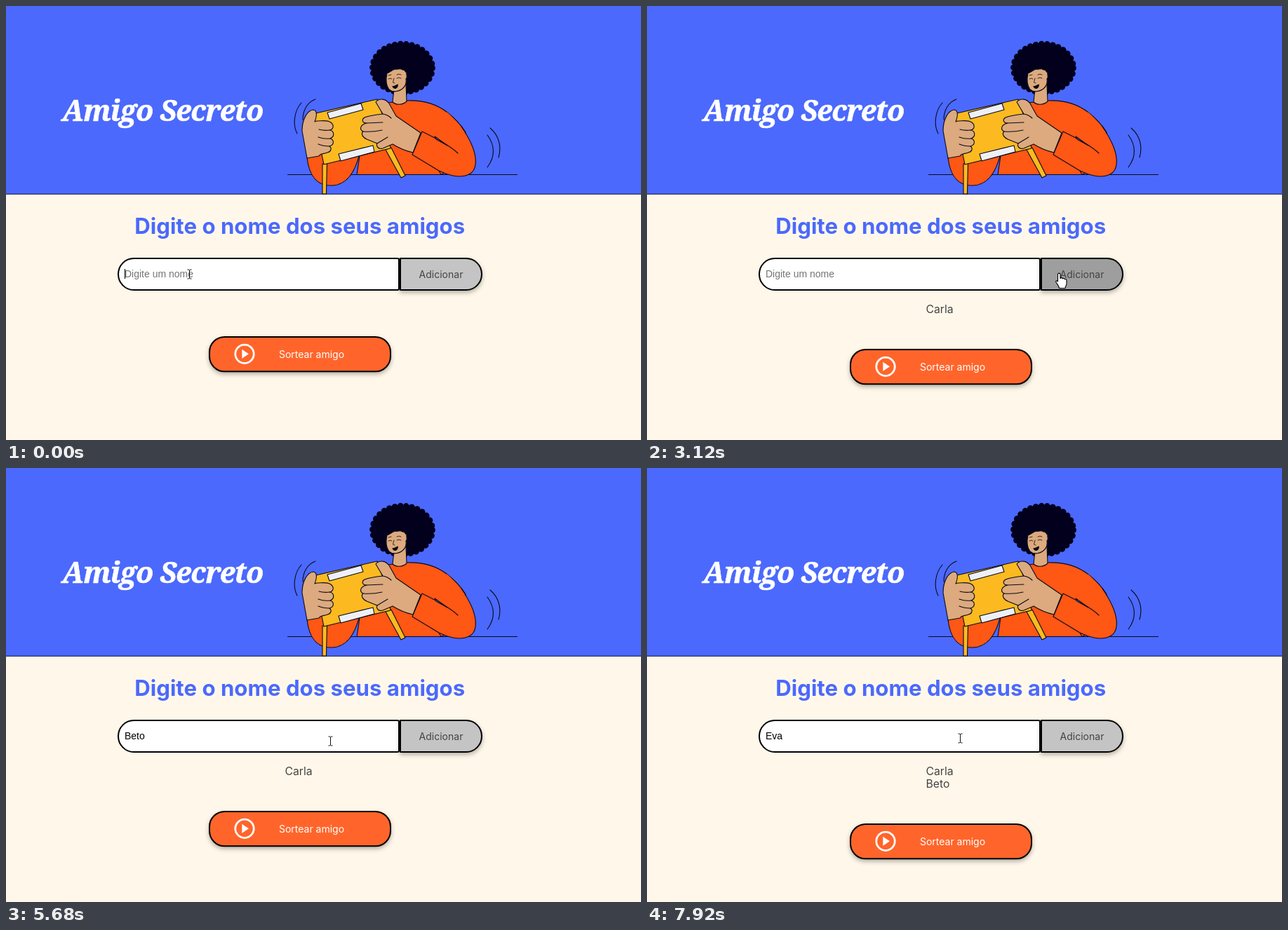
An HTML page that plays this animation: 905 by 619 pixels, repeating every 8000 ms.

```html
<!DOCTYPE html>
<html lang="pt-BR">
<head>
<meta charset="utf-8">
<title>Amigo Secreto</title>
<style>
  html, body { margin: 0; width: 100%; height: 100%; overflow: hidden; background: #fff8ea; }
  svg { display: block; width: 905px; height: 619px; }
  text { font-family: Inter, sans-serif; font-size: 14px; }
  .title { font: italic 900 41px "Noto Serif", serif; letter-spacing: -.95px; fill: #fff; stroke: #fff; stroke-width: .7; }
  .heading { font-size: 31.2px; font-weight: 700; fill: #4b69fd; }
  .field { font-family: "Liberation Sans", Arial, sans-serif; }
  .names text { font-size: 15.75px; fill: #444; }
  .art { stroke: #0a0a18; stroke-width: 1.1; stroke-linejoin: round; stroke-linecap: round; fill: none; }
  .skin { fill: #dcaa7e; }
  .shirt { fill: #ff5714; }
  .box { fill: #fcba20; }
  .label { fill: #eef0f8; }
  .hair { fill: #03001e; stroke: none; }
  .tuft { stroke: #03001e; stroke-width: 9; stroke-dasharray: 0 8.1; }
  .raised { filter: drop-shadow(0 3px 3px rgba(0, 0, 0, .3)); }
  .edge { stroke: #000; stroke-width: 2; }
</style>
</head>
<body>
<svg viewBox="0 0 905 619">
  <rect width="905" height="619" fill="#fff8ea"/>
  <rect width="905" height="268" fill="#4b69fd"/>
  <rect y="267.800" width="905" height="1" fill="#10102a"/>
  <text class="title" x="80" y="163.500">Amigo Secreto</text>

  <g class="art">
    <path d="M401.500 240.500H728.500"/>
    <path d="M415 182C408 169 411 149 421 138M423 162C423 148 430 137 441 133M686 184C697 199 697 215 686 230M690 174C704 186 706 202 702 216"/>

    <!-- torso and far sleeve -->
    <path class="shirt" d="M429 216C432 244 445 257 465 256C486 255 498 236 504 210L455 200Z"/>
    <path class="shirt" d="M500 240.500L506 200L528 140L552 137C558 141 566 140 571 135C591 134 612 139 628 151C641 161 650 172 655 180L648 226L620 240.500Z"/>

    <!-- head -->
    <ellipse class="hair" cx="565" cy="89" rx="44" ry="36"/>
    <ellipse class="tuft" cx="565" cy="88.500" rx="42.500" ry="34.200"/>
    <path class="skin" d="M553 118L551 137C556 142 566 141 571 136L570 112Z"/>
    <path class="skin" d="M543 96C541 105 542 114 546 119C551 124 561 122 566 117C570 113 571 109 570 104C573 101 570 98 571 95C568 94 569 90 565 91C562 88 558 91 555 90C550 91 547 95 543 96Z"/>
    <path stroke-width=".8" d="M545 104Q548 102 550 104M557 103Q560 101 563 103M545 99L549 98M557 98Q560 96 563 98M553 103L551.500 109L554 110"/>
    <path fill="#0a0a18" stroke="none" d="M550 114C554 115 556 111.500 559 111.500C559 116 556.500 118.500 554 118Q551 117 550 114Z"/>

    <!-- chair seat and legs -->
    <path class="box" d="M451 225L457.500 224L456.500 268H451ZM541 205L549 202L569 242L563 245Z"/>
    <path class="box" d="M437 154L529 133L541 168L548 203L453 226L444 182Z"/>
    <path class="label" d="M458 152L506 139L509 148L461 161ZM474 211L523 199L525 208L477 221Z"/>

    <!-- left hand -->
    <path class="skin" d="M429 217L422 178C422 162 429 149 438 148C444 149 443 157 440 165L443 164C450 164 457 162 463 166C468 170 467 176 461 177C468 178 469 186 462 189C468 191 468 198 461 200C465 203 463 208 458 209C453 211 448 210 446 214Z"/>
    <path d="M461 177Q453 178 446 176M462 189Q453 190 445 187M461 200Q452 200 445 197"/>

    <!-- near arm and right hand -->
    <path class="shirt" d="M593 179L644 210L628 151C643 163 658 185 665 201C671 217 672 234 660 240C646 247 627 241 617 235L579 212Z" stroke="none"/>
    <path d="M644 210Q632 198 593 179L579 212L617 235C627 240 646 247 660 240C672 234 671 217 665 201C661 191 656 182 649 172M617 235L620 240.500"/>
    <path fill="#4b69fd" d="M611 186L629 199L613 190Z"/>
    <path class="skin" d="M591 181L556 157L546 139C541 132 532 131 527 137L537 154C528 155 519 156 511 159C506 162 508 167 514 167C505 169 503 176 509 179C505 182 509 188 514 190L529 196C527 200 531 205 537 203L551 197C562 204 571 207 580 209Z"/>
    <path d="M514 167L537 166M509 179Q523 180 536 177M529 196L544 187M537 154Q544 155 549 160"/>
  </g>

  <text class="heading" x="418.700" y="325.300" text-anchor="middle">Digite o nome dos seus amigos</text>

  <path class="edge" fill="#fff" d="M182 360H558Q560 360 560 362V403Q560 405 558 405H182A22 22.500 0 0 1 182 360Z"/>
  <g class="raised">
    <path id="add" class="edge" d="M562 360H656A22 22.500 0 0 1 656 405H562Z"/>
  </g>
  <text x="620" y="387.700" text-anchor="middle" fill="#444">Adicionar</text>
  <text id="field" class="field" x="169" y="386.800"></text>
  <path id="caret" stroke="#000" d="M0 375V389"/>

  <g class="names">
    <text id="first" x="397.500" y="438">Carla</text>
    <text id="second" x="397.500" y="456">Beto</text>
  </g>

  <g id="draw">
    <rect class="edge raised" x="290" y="472" width="258" height="49.300" rx="21.500" fill="#ff652b"/>
    <circle cx="340" cy="496.300" r="13.200" fill="none" stroke="#fff" stroke-width="2.800"/>
    <path d="M336.300 489.800V502.800L346 496.300Z" fill="#fff"/>
    <text x="435.500" y="501.800" text-anchor="middle" fill="#fff">Sortear amigo</text>
  </g>

  <g id="beam" fill="none" stroke="#111" stroke-width="1">
    <path d="M-3 -6.500H-1L0 -5.500L1 -6.500H3M0 -5.500V5.500M-3 6.500H-1L0 5.500L1 6.500H3"/>
  </g>
  <path id="hand" fill="#fff" stroke="#000" stroke-width="1.100" stroke-linejoin="round"
    d="M-4.500 -8C-4.500 -10.500 -1 -10.500 -1 -8V-2.500C0 -4 2.200 -3.500 2.300 -2C3.300 -3.200 5 -2.500 5.200 -1.200C6.500 -2 8 -1.200 8 .5V5C8 8 6 8.500 6 11.500H-2.500C-2.500 8.500 -5 6.500 -7 3C-8 1 -6 0 -4.500 2Z"/>
</svg>
<script>
  const $ = id => document.getElementById(id);
  const LOOP = 8000, STEP = 80;

  // Pointer stops: time, x, y
  const stops = [
    [0, 261, 382], [1920, 261, 382], [2480, 472, 404], [2800, 590, 391],
    [3360, 590, 391], [3840, 462, 386], [4160, 462, 386], [4400, 462, 389],
    [5760, 462, 389], [6080, 583, 389], [6640, 583, 389], [7040, 446, 385], [LOOP, 446, 385]
  ];
  // Entries: focus time, blur time, word, key times
  const entries = [
    [0, 3040, "Carla", [1040, 1200, 1440, 1600, 1760]],
    [4160, 6240, "Beto", [4480, 4720, 4960, 5120]],
    [7040, LOOP, "Eva", [7200, 7280, 7360]]
  ];

  const show = (id, on) => $(id).style.display = on ? "" : "none";

  function pointer(t) {
    const i = Math.max(1, stops.findIndex(s => s[0] > t));
    const [t0, x0, y0] = stops[i - 1], [t1, x1, y1] = stops[i];
    const k = (t - t0) / (t1 - t0), e = k * k * (3 - 2 * k);
    return [x0 + (x1 - x0) * e, y0 + (y1 - y0) * e];
  }

  function render(t) {
    const entry = entries.find(([from, to]) => t >= from && t < to);
    const pressed = entry ? entry[3].filter(k => k <= t) : [];
    const typed = entry ? entry[2].slice(0, pressed.length) : "";
    const field = $("field");
    field.textContent = typed || "Digite um nome";
    field.setAttribute("fill", typed ? "#000" : "#757575");

    // The caret restarts its blink at every key press
    const since = entry ? t - Math.max(entry[0], ...pressed) : 0;
    show("caret", entry && since % 1000 < 500);
    const width = typed ? field.getComputedTextLength() : 0;
    $("caret").setAttribute("transform", `translate(${Math.round(169 + width) + .5} 0)`);

    const count = (t >= 3040) + (t >= 6240);
    show("first", count > 0);
    show("second", count > 1);
    $("draw").setAttribute("transform", `translate(0 ${count * 18})`);

    const [x, y] = pointer(t).map(Math.round);
    const over = x >= 562 && y >= 359 && y <= 405;
    $("add").setAttribute("fill", over ? "#9e9e9e" : "#c4c4c4");
    show("hand", over);
    show("beam", !over);
    $("hand").setAttribute("transform", `translate(${x} ${y})`);
    $("beam").setAttribute("transform", `translate(${x + .5} ${y + .5})`);
  }

  const start = performance.now();
  function tick(now) {
    const t = Math.max(0, now - start) % LOOP;
    render(Math.floor(t / STEP) * STEP);
    requestAnimationFrame(tick);
  }
  render(0);
  requestAnimationFrame(tick);
</script>
</body>
</html>
```
